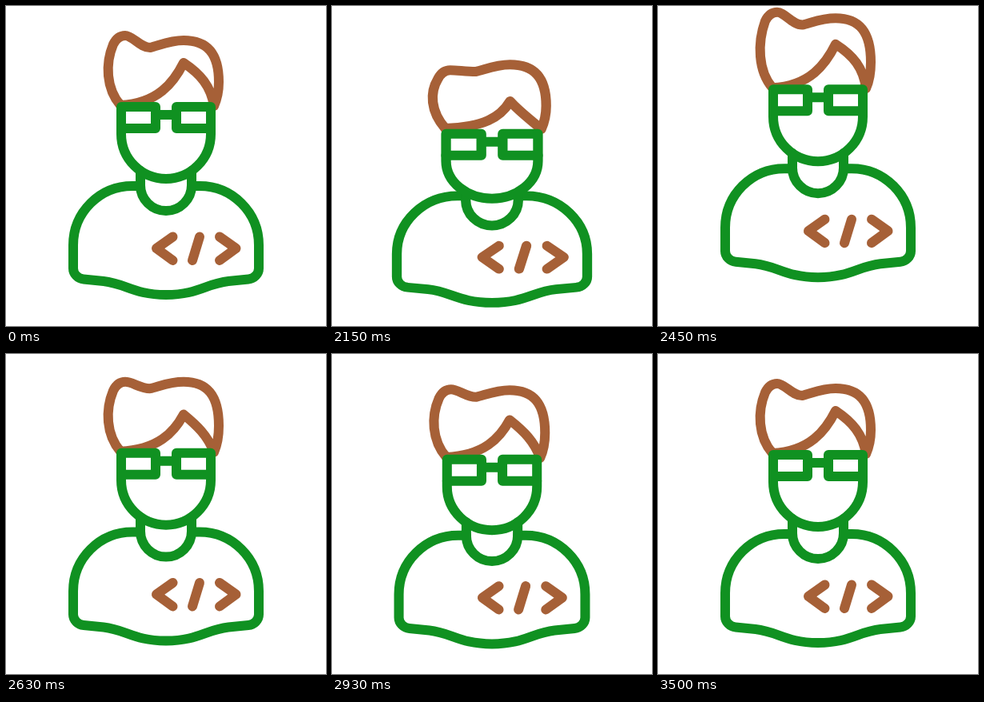
Animation of 400 by 400 pixels, one loop 3.53 s. Source, as an HTML page:

```html
<!DOCTYPE html>
<html lang="en">
<head>
<meta charset="utf-8">
<title>Jumping developer</title>
<style>
  html, body { margin: 0; width: 100%; height: 100%; overflow: hidden; background: #fff; }
  svg { display: block; width: 100%; height: 100%; }
  path { fill: none; stroke-width: 12; stroke-linecap: round; stroke-linejoin: round; }
  .brown { stroke: #a66037; }
  .green { stroke: #109121; }
</style>
</head>
<body>
<svg viewBox="0 0 400 400">
  <path id="hair" class="brown"/>
  <g id="torso">
    <path class="green" d="M168 225H158C117 225 84 258 84 299V328C84 335 90 341 97 341.5L122 344C150 347 160 361 200 361C240 361 250 347 278 344L303 341.5C310 341 316 335 316 328V299C316 258 283 225 242 225H232"/>
    <path class="brown" d="M208.500 288.500L188 303L208.500 318M242 288.500L233 318M267 288.500L287.500 303L267 318"/>
  </g>
  <path id="neck" class="green"/>
  <path id="face" class="green"/>
  <path id="glasses" class="green"/>
</svg>
<script>
const LOOP = 3530, START = 2030, STEP = 30;

const $ = id => document.getElementById(id);
const draw = (id, d) => $(id).setAttribute('d', d);

// Smooth swing through turning points given as [time, value]
const swing = (...points) => t => {
  let i = 1;
  while (i < points.length - 1 && t > points[i][0]) i++;
  const [t0, v0] = points[i - 1], [t1, v1] = points[i];
  const u = Math.min(1, Math.max(0, (t - t0) / (t1 - t0)));
  return v0 + (v1 - v0) * u * u * (3 - 2 * u);
};

// Crouch, jump, land, rebound, settle
const bodyAt = swing([1960, 0], [2140, 10], [2435, -22], [2775, 10], [3030, -3], [3230, 1], [3500, 0]);
// How far the head sinks into the shoulders
const sinkAt = swing([2020, 0], [2140, 24], [2370, 0], [2620, 0], [2780, 28], [2980, 0]);
// The fringe trails behind the head, and the top of the hair lifts off it
const droopAt = swing([2030, 0], [2180, 16], [2480, -2], [2775, 15], [3040, 0]);
const liftAt = swing([2030, 0], [2250, 6], [2640, 6], [2780, 3], [3050, 4], [3300, 0]);

function render(t) {
  const rest = t < START;
  const [body, sink, droop, lift] =
    [bodyAt, sinkAt, droopAt, liftAt].map(at => rest ? 0 : at(t));

  const wide = 1 + Math.max(0, body) * 0.0026, high = 1.7 - wide * 0.7;
  $('torso').setAttribute('transform',
    `translate(200 ${361 + body}) scale(${wide} ${high}) translate(-200 -361)`);
  for (const id of ['hair', 'neck', 'face', 'glasses']) {
    $(id).setAttribute('transform', `translate(200 0) scale(${wide} 1) translate(-200 0)`);
  }

  const eyes = body + sink;
  const jaw = 160 + eyes, depth = 56 - sink * 0.38;
  const nape = jaw + depth * 0.82, collar = 224 + body + sink * 0.36;
  draw('neck', `M168 ${nape}V${collar}A32 32 0 0 0 232 ${collar}V${nape}`);
  draw('face', `M144 ${jaw - 7}V${jaw}A56 ${depth} 0 0 0 256 ${jaw}V${jaw - 7}`);

  const lens = x => `M${x} ${126 + eyes}h43v27h-43z`;
  draw('glasses', lens(144) + lens(213) + `M187 ${136 + eyes}H213`);

  const base = eyes - sink * 0.2, crown = eyes - lift, fringe = eyes + droop;
  const quiff = crown + droop * 0.9, dip = eyes - lift * 1.1;
  const pull = droop * 0.6;
  draw('hair', `M143 ${124 + base}
    C125 ${103 + base} 124 ${72 + (quiff + base) / 2} 134 ${48 + quiff}
    C138 ${40 + quiff} 143 ${37 + quiff} 149 ${37 + quiff}
    C158 ${37 + quiff} 168 ${52 + dip} 180 ${52 + dip}
    C190 ${50 + dip} 204 ${43 + crown} 222 ${43 + crown}
    C252 ${43 + crown} 266 ${60 + crown} 266 ${95 + (crown + base) / 2}
    C266 ${107 + base} 264 ${116 + base} 260 ${125 + base}
    C${256 - pull} ${100 + eyes + pull} ${243 - pull} ${85 + fringe} 222 ${71 + fringe}
    C210 ${95 + fringe - droop * 0.25} 190 ${122 + base} 143 ${124 + base}Z`);
}

const origin = performance.now();
function tick() {
  const t = (performance.now() - origin) % LOOP;
  render(t < START ? 0 : START + Math.floor((t - START) / STEP) * STEP);
  requestAnimationFrame(tick);
}
tick();
</script>
</body>
</html>
```
